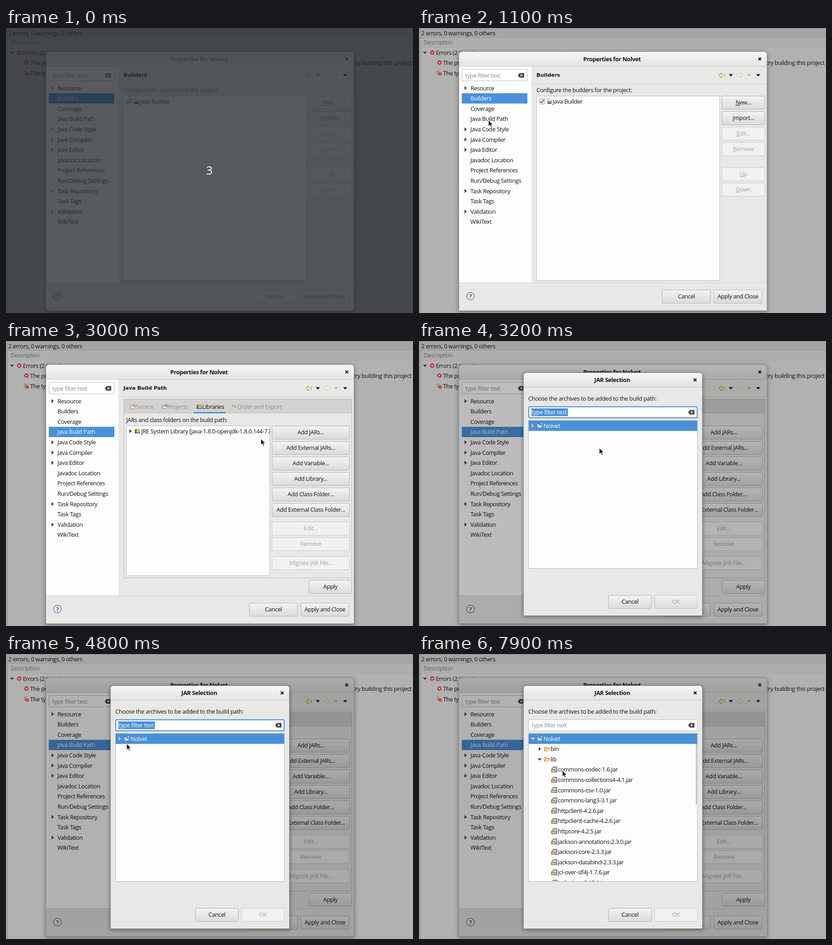
Recreate the animation shown at these times as an HTML page. Size 894 by 626 pixels, loop 8000 ms.

```html
<!DOCTYPE html>
<html lang="en">
<head>
<meta charset="utf-8">
<title>Adding JARs to a build path</title>
<style>
html, body { margin: 0; width: 100%; height: 100%; overflow: hidden; background: #b1b1b1; }
svg { display: block; width: 894px; height: 626px; }
text { font: 12.8px "Open Sans", "Noto Sans", sans-serif; letter-spacing: -.38px; white-space: pre; }
.bold { font-weight: 700; }
.head { font: bold 11.2px "DejaVu Sans", sans-serif; letter-spacing: 0; }
.mid { text-anchor: middle; }
.end { text-anchor: end; }
.win { filter: drop-shadow(0 2px 5px rgba(0,0,0,.4)); }
</style>
</head>
<body>
<svg id="stage" viewBox="0 0 894 626"></svg>
<script>
const PROJECT = 'Nolvet', INK = '#101212', SOFT = '#8b8e8f', BLUE = '#4a90d9', WHITE = '#fdfdfd', ROW = 22.6;

const rect = (x, y, w, h, fill, stroke = 'none', rx = 0) =>
  `<rect x="${x}" y="${y}" width="${w}" height="${h}" rx="${rx}" fill="${fill}" stroke="${stroke}"/>`;
const path = (d, fill = 'none', stroke = 'none', w = 1) =>
  `<path d="${d}" fill="${fill}" stroke="${stroke}" stroke-width="${w}"/>`;
// y is the middle of the line; an underscore marks the mnemonic letter
const text = (x, y, s, fill = INK, cls = '') =>
  `<text x="${x}" y="${y + 4.6}" fill="${fill}" class="${cls}">${
    s.replace(/_(.)/, '<tspan text-decoration="underline">$1</tspan>')}</text>`;
const at = (x, y, s, k = 1) => `<g transform="translate(${x} ${y}) scale(${k})">${s}</g>`;
const layer = (id, s) => `<g id="${id}">${s}</g>`;

const right = (x, y, c) => path(`M${x - 2} ${y - 4.5}l5 4.5l-5 4.5z`, c);
const down = (x, y, c) => path(`M${x - 4.5} ${y - 2}h9l-4.5 5z`, c);
const cross = (x, y, c) => path(`M${x - 3} ${y - 3}l6 6m0-6l-6 6`, 'none', c, 2);
const frame = (x, y, w, h) =>
  `M${x} ${y + h}v${7 - h}q0-7 7-7h${w - 14}q7 0 7 7v${h - 7}z`;
const clear = (x, y, c) =>
  path(`M${x - 7} ${y}l4-5h10v10h-10z`, c) + path(`M${x - 1} ${y - 2}l4 4m0-4l-4 4`, 'none', '#fff', 1.3);
const arrow = (x, y, dir, c) =>
  `<g transform="translate(${x} ${y}) scale(${dir} 1)">${
    path('M-6 0l5-5v3h7v4h-7v3z', '#fdf6dc', c, 1.2)}</g>`;

// Small icons, drawn around their centre
const folder = (x, y) => at(x, y, path('M-5.5 4.5v-9h4l1 2h5v2', '#f7dfa0', '#b98a35') +
  path('M-5.5 4.5l3-5.5h9l-3 5.5z', '#fbe9b5', '#b98a35'));
const projectIcon = (x, y, c = '#5d7fae') => at(x, y, path('M-5.5 4.5v-8h4l1 1.5h5v2', '#dbe8f8', c) +
  path('M-5.5 4.5l3-5h9l-3 5z', '#f3f1de', c) + path('M2-5.5h4v3h-4z', '#e6eefa', c));
const books = (x, y) => at(x, y, rect(-5, -4, 3, 7, '#2f7d74') + rect(-2, -5, 3, 8, '#e59a2c') +
  path('M1.5-4l2.5-1l3 8h-3z', '#d9862a') + rect(-6, 3, 13, 2, '#3f6bb0'));
const sheet = (x, y, mark) => at(x, y, path('M-4.5-5.5h6l3 3v8h-9z', '#f4f7fc', '#7d8fae') + mark);
const lines = path('M-2.5-2.5h3m-3 2h5m-5 2h5m-5 2h5', 'none', '#6b8fc4');
const xMark = path('M-2-2.5l4 5.5m0-5.5l-4 5.5', 'none', '#2f5288', 1.5);
const jar = (x, y) => at(x, y, path('M-6 5.5v-6l4-5.5h8v11.5z', '#a9a79f', '#55534c') +
  path('M-6 5.5v-5h7v5z', '#e2bf7c', '#80683a') +
  path('M-2-3.5h7m-8.500 2h8.500m-7 4.500h5', 'none', '#f0ede2'));
const error = (x, y, k) => at(x, y, '<circle r="4.7" fill="#b5262c"/>' +
  path('M-1.8-1.8l3.6 3.6m0-3.6l-3.6 3.6', 'none', '#e8d6d6', 1.3), k);

// kinds: on, off (disabled), fade (turning off), back and dead (window without focus), hover, press
const button = (x, y, w, label, kind = 'on') => {
  const [fill, line, ink] = {
    on: ['url(#btn)', '#b2b1ad', INK], off: ['#f1f1f0', '#cbcbc8', '#a3a5a5'],
    fade: ['url(#btn)', '#bfbebb', '#a3a5a5'],
    back: ['#e9e9e8', '#c3c3c0', SOFT], dead: ['#efefee', '#cfcfcc', '#c4c5c5'],
    hover: ['#f7f7f6', '#b2b1ad', INK], press: ['#cfcecb', '#a3a29e', INK]
  }[kind];
  return rect(x + .5, y + .5, w - 1, 29, fill, line, 2.5) + text(x + w / 2, y + 14.5, label, ink, 'mid');
};

function background() {
  return rect(0, 0, 894, 626, '#b1b1b1') + rect(0, 0, 894, 21, '#a5a5a4') + rect(0, 0, 894, 1, '#858585') +
    rect(3, 21, 891, 21, '#aeaeae') + rect(0, 20, 894, 1, '#999') + rect(3, 42, 891, 1, '#a6a6a6') +
    rect(0, 21, 3, 605, '#a4a4a3') + rect(3, 0, 1, 626, '#8f8f8f') +
    text(5, 11, '2 errors, 0 warnings, 0 others') + text(10, 31, 'Description', '#606263') +
    down(13, 54, '#3a3a3a') + error(29, 54) + text(37, 54, 'Errors (2 items)') +
    error(45, 76) + text(53, 76, 'The project') + text(891, 76, 'try building this project', INK, 'end') +
    path('M40 94.5h4v7h-4z', '#c4a36c', '#7d6a45') + error(46.5, 101, .75) + text(53, 99, 'The type');
}

const TREE = ['+Resource', 'Builders', 'Coverage', 'Java Build Path', '+Java Code Style', '+Java Compiler',
  '+Java Editor', 'Javadoc Location', 'Project References', 'Run/Debug Settings', '+Task Repository',
  'Task Tags', '+Validation', 'WikiText'];

function buildersPage(active) {
  const on = active ? 'on' : 'back', off = active ? 'off' : 'dead';
  const list = ['_New...', '_Import...', '_Edit...', '_Remove', '_Up', '_Down'];
  return text(258, 136, 'Configure the builders for the project:', active ? INK : SOFT) +
    rect(258.5, 149.5, 402, 405, WHITE, '#bdbdba') +
    rect(263.5, 154.5, 13, 13, '#e4e4e2', '#b9b9b6', 2) +
    path('M266 161l3 3l6-7', 'none', '#777a7a', 2) +
    sheet(286, 161, rect(-3, 0, 8, 5, '#34527f') + path('M-1 1v3m2-3v3m2-3v3', 'none', '#fff', .8)) +
    text(293.5, 161, 'Java Builder', active ? INK : '#2e3436') +
    list.map((s, i) => button(665, [149, 183, 217, 251, 306, 340][i], 95, s, i < 2 ? on : off)).join('');
}

function pathPage() {
  const names = ['Add JARs...', 'Add External JARs...', 'Add Variable...', 'Add Library...',
    'Add Class Folder...', 'Add External Class Folder...', 'Edit...', 'Remove', 'Migrate JAR File...'];
  const tops = [186, 220, 254, 288, 322, 356, 397, 431, 473];
  return rect(258.5, 127.5, 501, 393, '#e8e8e7', '#bdbcb9') + rect(259, 128, 500, 31, '#d3d2d0') +
    rect(259, 158, 500, 1, '#c1c0bd') + rect(412, 156, 70, 3, BLUE) +
    projectIcon(278, 144, '#b98a55') + text(285.5, 144, 'Source', SOFT) +
    projectIcon(348, 144) + text(355, 144, 'Projects', SOFT) +
    books(424, 144) + text(431, 144, 'Libraries') +
    path('M498 139v5h7m-3-3l3 3l-3 3', 'none', '#c79a4c', 1.5) + text(508, 144, 'Order and Export', SOFT) +
    text(264, 173, 'JARs and class folders on the build path:') +
    rect(264.5, 186.5, 315, 329, WHITE, '#b9b9b6') +
    right(273, 198, '#444') + books(288, 198) +
    `<g clip-path="url(#libs)">${text(297, 198, 'JRE System Library [java-1.8.0-openjdk-1.8.0.144-7.b01]')}</g>` +
    layer('bar', rect(267, 511.5, 229, 2.5, '#d9d9d8', 'none', 1)) +
    names.map((s, i) => button(584, tops[i], 171, s, i > 5 ? 'off' : 'on')).join('') +
    button(665, 525, 95, 'Apply');
}

function properties(active, page) {
  const ink = active ? INK : '#2e3436', mark = active ? '#444' : '#9b9d9d';
  const sel = page === 'path' ? 3 : 1, btn = active ? 'on' : 'back';
  const tree = TREE.map((s, i) => {
    const y = 132 + ROW * i;
    return (i === sel ? rect(94, y - 11.3, 144, ROW, BLUE) : '') +
      (s[0] === '+' ? right(102, y, mark) : '') +
      text(113, y, s.replace('+', ''), i === sel ? '#fff' : ink);
  }).join('');
  return path(frame(87.5, 52, 677, 569), '#e8e8e7', '#8c8c89').replace('<path', '<path class="win"') +
    path(frame(88, 52.5, 676, 32), active ? 'url(#title)' : '#e6e6e5') + rect(88, 84, 676, 1, '#c9c8c5') +
    text(424, 68, `Properties for ${PROJECT}`, active ? INK : SOFT, 'bold mid') +
    cross(748.5, 68, active ? INK : '#777') +
    rect(88, 85, 159, 474, WHITE) + rect(88, 559, 676, 1, '#cfcfcc') + rect(247, 122, 517, 1, '#d3d3d0') +
    rect(94.5, 91, 143, 25, '#fff', '#b9b9b6', 2) + text(101.5, 104, 'type filter text', SOFT) +
    clear(224, 104, active ? '#444' : '#858888') + tree +
    text(258, 102.5, page === 'path' ? 'Java Build Path' : 'Builders', INK, 'head') +
    arrow(665, 104, 1, '#c8962b') + down(685, 103.5, active ? INK : '#858888') +
    arrow(705, 104, -1, '#e2c98f') + down(725, 103.5, '#b5b5b3') + down(745, 103.5, INK) +
    (page === 'path' ? pathPage() : buildersPage(active)) +
    '<circle cx="113" cy="589" r="8.3" fill="#f4f5f8" stroke="#455a80" stroke-width="1.3"/>' +
    text(113, 589, '?', '#34486f', 'bold mid') +
    button(534, 575, 107, 'Cancel', btn) + button(647, 575, 107, 'Apply and Close', btn);
}

const JARS = ['commons-codec-1.6', 'commons-collections4-4.1', 'commons-csv-1.0', 'commons-lang3-3.1',
  'httpclient-4.2.6', 'httpclient-cache-4.2.6', 'httpcore-4.2.5', 'jackson-annotations-2.3.0',
  'jackson-core-2.3.3', 'jackson-databind-2.3.3', 'jcl-over-slf4j-1.7.6', 'joda-time-2.12.1'];
const rowY = i => 186 + ROW * i;
const dir = (i, name, open) => (open ? down : right)(265, rowY(i), '#444') +
  folder(281, rowY(i)) + text(289, rowY(i), name);

function selection() {
  const closed = right(249.5, 186, '#b9d6f4'), opened = down(250, 186, '#d4e6f8');
  return path(frame(229.5, 69.5, 393, 534), '#e8e8e7', '#7f7f7c').replace('<path', '<path class="win"') +
    path(frame(230, 70, 392, 31), 'url(#title)') + rect(230, 100.5, 392, 1, '#bfbebb') +
    text(424.5, 85.5, 'JAR Selection', INK, 'bold mid') + cross(606.5, 85.5, INK) +
    text(240, 126, 'Choose the archives to be added to the build path:') +
    rect(240.5, 144, 371, 25, '#fff', '#b9b9b6', 2) +
    layer('typing', rect(241, 144.5, 370, 24, '#fff', BLUE, 2).replace('/>', ' stroke-width="2"/>') +
      rect(247, 148, 80, 17, BLUE) + text(247.5, 156.5, 'type filter text', '#fff')) +
    layer('idle', text(247.5, 156.5, 'type filter text', SOFT)) + clear(598, 156.5, '#444') +
    rect(240.5, 174.5, 371, 325, WHITE, '#b9b9b6') + rect(241, 175, 370, 22.5, BLUE) +
    projectIcon(265, 186) + text(273.5, 186, PROJECT, '#fff') +
    layer('shut', closed) +
    layer('open', opened + dir(1, 'bin')) +
    layer('folders', dir(2, 'lib') + dir(3, 'src') +
      sheet(281, rowY(4), lines) + text(289, rowY(4), '.gitignore') +
      sheet(281, rowY(5), xMark) + text(289, rowY(5), '.project')) +
    layer('jars', dir(2, 'lib', true) + `<g clip-path="url(#rows)">${
      JARS.map((s, i) => jar(297, rowY(i + 3)) + text(305, rowY(i + 3), s + '.jar')).join('')}</g>` +
      rect(608, 177, 2.5, 154, 'rgba(130,140,150,.5)', 'none', 1)) +
    button(416, 558, 95, 'Cancel') + button(517, 558, 95, 'OK', 'off') +
    layer('okFading', button(517, 558, 95, 'OK', 'fade'));
}

const gradient = (id, a, b) => `<linearGradient id="${id}" x2="0" y2="1"><stop stop-color="${a}"/>` +
  `<stop offset="1" stop-color="${b}"/></linearGradient>`;
const clip = (id, ...box) => `<clipPath id="${id}">${rect(...box)}</clipPath>`;

const stage = document.getElementById('stage');
stage.innerHTML = `<defs>${gradient('btn', '#f3f3f2', '#dcdbd9')}${gradient('title', '#f6f6f5', '#e4e4e2')}${
  clip('libs', 265, 187, 314, 328)}${clip('rows', 241, 175, 370, 324)}</defs>` +
  background() +
  layer('unfocused', properties(false, 'builders')) +
  layer('focused', properties(true, 'builders')) +
  layer('buildPath', properties(true, 'path')) +
  layer('hover', button(584, 186, 171, 'Add JARs...', 'hover')) +
  layer('press', button(584, 186, 171, 'Add JARs...', 'press')) +
  layer('dim', path(frame(88, 52, 676, 569), '#000')) +
  layer('chooser', selection()) +
  layer('cursor', path('M0 0v13.5l3.2-3l2.3 5l2.2-1l-2.3-4.7h4.3z', '#111', '#fff', .9)) +
  layer('countdown', rect(0, 0, 894, 626, 'rgba(32,36,42,.75)') +
    '<text x="446.5" y="322" fill="#fff" class="mid" style="font-size:26px">3</text>');

const part = {};
stage.querySelectorAll('g[id]').forEach(g => part[g.id] = g);
const show = (id, on) => part[id].style.display = on ? '' : 'none';

// Pointer stops: time, x, y
const STOPS = [[400, 85, 226], [600, 152, 211], [1000, 152, 211], [1200, 153, 194], [1400, 153, 194],
  [1900, 461, 209], [2300, 600, 209], [2500, 640, 204], [2800, 637, 206], [3000, 560, 215], [3100, 560, 215],
  [3200, 396, 235], [3600, 325, 215], [3800, 325, 215], [3900, 310, 210], [4000, 310, 210], [4100, 286, 204],
  [4300, 286, 204], [4400, 275, 200], [4500, 275, 200], [4600, 269, 197], [4700, 269, 197], [4800, 265, 197],
  [4900, 261, 195], [5000, 261, 195], [5100, 260, 195], [5200, 260, 195], [5300, 257, 192], [5800, 257, 193],
  [5900, 257, 195], [6000, 257, 195], [6100, 262, 206], [6200, 262, 206], [6400, 266, 215], [6500, 266, 215],
  [6700, 266, 223], [6800, 266, 223], [7300, 264, 232], [7600, 264, 232], [7900, 315, 256]];

function pointer(t) {
  const i = STOPS.findIndex(s => s[0] > t);
  if (i < 1) return STOPS[STOPS.length - 1];
  const a = STOPS[i - 1], b = STOPS[i], k = (t - a[0]) / (b[0] - a[0]);
  return a.map((v, j) => v + (b[j] - v) * k);
}

function draw(now) {
  const t = Math.floor(now % 8000 / 100) * 100;
  show('countdown', t < 200);
  part.countdown.style.opacity = t < 100 ? 1 : .45;
  show('unfocused', t < 1100);
  show('focused', t === 1100);
  show('buildPath', t >= 1200);
  show('bar', t >= 1500 && t < 2900);
  show('hover', t >= 2400 && t < 3000);
  show('press', t === 2700);
  show('dim', t >= 3200);
  part.dim.style.opacity = Math.min(.3, .26 + (t - 3200) / 10000);
  show('chooser', t >= 3200);
  show('okFading', t < 3400);
  show('typing', t < 5500);
  show('idle', t >= 5500);
  show('shut', t < 5600);
  show('open', t >= 5600);
  show('folders', t >= 5600 && t < 7600);
  show('jars', t >= 7600);
  show('cursor', t >= 400);
  const [, x, y] = pointer(t);
  part.cursor.setAttribute('transform', `translate(${x} ${y})`);
  requestAnimationFrame(draw);
}
draw(0);
</script>
</body>
</html>
```
